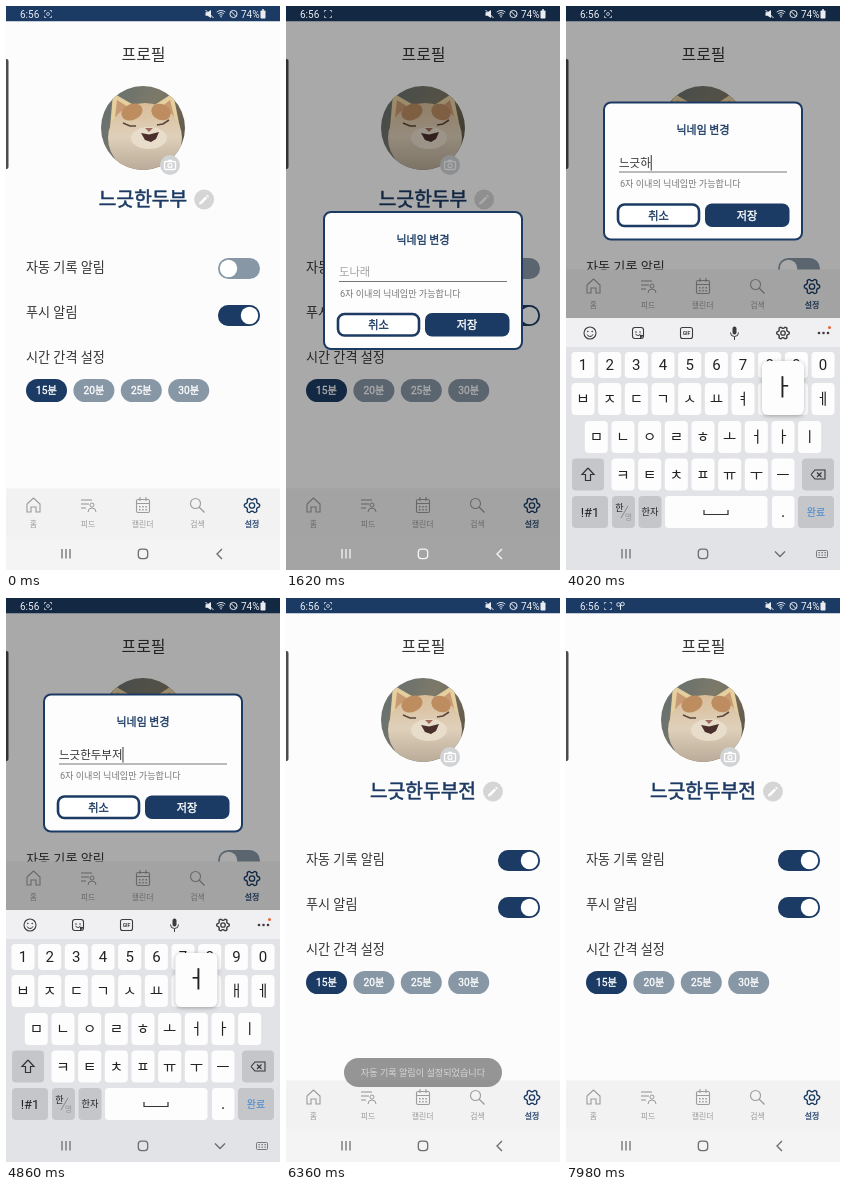
An HTML page with a canvas that plays this animation: 274x564 px, repeating every 8000 ms.

```html
<!DOCTYPE html>
<html lang="ko">
<head>
<meta charset="utf-8">
<title>프로필</title>
<style>
html, body { margin: 0; width: 100%; height: 100%; overflow: hidden; background: #fcfcfc; }
canvas { display: block; width: 274px; height: 564px; }
</style>
</head>
<body>
<canvas id="stage"></canvas>
<script>
const W = 274, H = 564, LOOP = 8000;
const NAVY = '#1c3b64', SLATE = '#8797a5', INK = '#333', GREY = '#9b9b9b';
const FONT = 'Roboto, "Noto Sans CJK KR", "Noto Sans CJK", sans-serif';
const canvas = document.getElementById('stage');
const g = canvas.getContext('2d');
const dpr = window.devicePixelRatio || 1;
canvas.width = W * dpr;
canvas.height = H * dpr;

const ramp = (t, a, b) => Math.min(1, Math.max(0, (t - a) / (b - a)));
const ease = (t, a, b) => 1 - Math.pow(1 - ramp(t, a, b), 3);

function rect(x, y, w, h, r, fill, stroke, lw = 1) {
  g.beginPath();
  g.roundRect(x, y, w, h, r);
  if (fill) { g.fillStyle = fill; g.fill(); }
  if (stroke) { g.strokeStyle = stroke; g.lineWidth = lw; g.stroke(); }
}
function oval(x, y, rx, ry, fill, tilt = 0) {
  g.beginPath();
  g.ellipse(x, y, rx, ry, tilt, 0, 7);
  g.fillStyle = fill; g.fill();
}
function disc(x, y, r, fill, stroke, lw = 1) {
  if (fill) oval(x, y, r, r, fill);
  if (stroke) arc(x, y, r, 0, 7, stroke, lw);
}
function arc(x, y, r, a, b, c, lw = 1) {
  g.beginPath();
  g.arc(x, y, r, a, b);
  g.strokeStyle = c; g.lineWidth = lw; g.stroke();
}
function line(c, lw, ...p) {
  g.beginPath();
  for (let i = 0; i < p.length; i += 2) g.lineTo(p[i], p[i + 1]);
  g.strokeStyle = c; g.lineWidth = lw; g.stroke();
}
function poly(c, ...p) {
  g.beginPath();
  for (let i = 0; i < p.length; i += 2) g.lineTo(p[i], p[i + 1]);
  g.fillStyle = c; g.fill();
}
// y is the visual middle of the line; medium weight is a thin outline on regular
function text(s, x, y, size, c, align = 'left', weight = 400) {
  g.font = `${weight === 500 ? 400 : weight} ${size}px ${FONT}`;
  g.textAlign = align;
  g.fillStyle = g.strokeStyle = c;
  const base = y + size * 0.365;
  g.fillText(s, x, base);
  if (weight === 500) {
    g.lineWidth = size * 0.03;
    g.strokeText(s, x, base);
  }
  return g.measureText(s).width;
}
function at(x, y, alpha, fn) {
  g.save();
  g.translate(x, y);
  g.globalAlpha *= alpha;
  fn();
  g.restore();
}

// ---- icons ----
function gear(x, y, r, c, solid) {
  g.beginPath();
  for (let i = 0; i < 72; i++) {
    const a = i / 36 * Math.PI, k = r * (0.87 + 0.13 * Math.tanh(2 * Math.cos(6 * a)));
    g.lineTo(x + Math.cos(a) * k, y + Math.sin(a) * k);
  }
  g.closePath();
  g.fillStyle = g.strokeStyle = c;
  g.lineWidth = 1.4;
  solid ? g.fill() : g.stroke();
  disc(x, y, r * 0.35, solid && '#f1f1f1', !solid && c, 1.3);
}
function corners(x, y, r, c, dot) {
  for (const sx of [-1, 1]) for (const sy of [-1, 1])
    line(c, 1, x + sx * r, y + sy * r * 0.5, x + sx * r, y + sy * r, x + sx * r * 0.5, y + sy * r);
  if (dot) disc(x, y, r * 0.42, null, c);
}
function mute(x, y, c, k = 1) {
  at(x, y, 1, () => {
    g.scale(k, k);
    poly(c, -4, -1.7, -2, -1.7, 1.5, -4, 1.5, 4, -2, 1.7, -4, 1.7);
    line(c, 1, -4, -4, 4, 4);
  });
}
function wifi(x, y, c, k = 1) {
  for (const r of [2.5, 5, 7.5]) arc(x, y + 3 * k, r * k, -2.3, -0.84, c, 1.1 * k);
  disc(x, y + 3 * k, 0.9 * k, c);
}
function sprout(x, y, c) {
  line(c, 1, x, y + 4, x, y - 1);
  arc(x - 2, y - 1.5, 1.8, 0, 7, c, 0.9);
  arc(x + 2, y - 2, 1.8, 0, 7, c, 0.9);
}
function statusIcons(c) {
  mute(203.5, 8, c);
  wifi(215, 8.3, c, 0.85);
  disc(227.5, 8, 3.6, null, c);
  line(c, 1, 225, 5.5, 230, 10.5);
  text('74%', 235, 8.5, 10, c);
  rect(254.5, 4.5, 5, 8, 0.8, c);
  rect(256, 3.2, 2, 1.5, 0, c);
}

// ---- app ----
function gradient(x0, y0, x1, y1, ...colors) {
  const grad = g.createLinearGradient(x0, y0, x1, y1);
  colors.forEach((c, i) => grad.addColorStop(i / (colors.length - 1), c));
  return grad;
}
function avatar() {
  g.save();
  g.beginPath(); g.arc(137, 122, 42, 0, 7); g.clip();
  rect(94, 79, 86, 86, 0, gradient(95, 100, 180, 140, '#66706f', '#7d7969', '#5d5546'));
  poly('#e6cf9f', 104, 122, 107, 87, 131, 101);
  poly('#e6cf9f', 147, 100, 167, 87, 174, 122);
  poly('#c79a74', 109, 112, 111, 94, 124, 102);
  poly('#c79a74', 154, 102, 164, 94, 169, 114);
  oval(139, 132, 37, 35, gradient(0, 97, 0, 164, '#d9bd98', '#dfd0ba', '#b9ab98'));
  oval(126, 106, 11, 8, '#bd8d60', -0.4);
  oval(155, 106, 10, 8, '#bd8d60', 0.4);
  line('#5a463a', 1.6, 117, 117, 124, 120, 130, 120);
  line('#5a463a', 1.6, 151, 119, 157, 118, 163, 114);
  oval(143, 132, 18, 11, '#e8dccb');
  poly('#9d6a5b', 139, 122, 147, 122, 143, 126);
  poly('#4a2f2c', 135, 127, 143, 128.5, 153, 126, 150, 133, 145, 136, 139, 134);
  g.restore();
  disc(164, 159, 10, '#d1d3d5');
  rect(158.5, 155.5, 11, 8, 1.5, null, '#fff', 1.3);
  line('#fff', 1.5, 162, 154.5, 166, 154.5);
  disc(164, 159.5, 2, null, '#fff', 1.2);
}
function toggle(y, on) {
  rect(212, y - 10.5, 42, 21, 10.5, SLATE);
  at(0, 0, on, () => rect(212, y - 10.5, 42, 21, 10.5, NAVY));
  disc(222.5 + 21 * on, y, 8.7, '#fff');
}
function tabs(shift) {
  at(0, shift, 1, () => {
    rect(0, 482.5, W, 82, 0, '#f2f2f2');
    line(GREY, 1.1, 21, 498, 27.5, 492, 34, 498, 34, 506, 30, 506, 30, 501, 25, 501, 25, 506, 21, 506, 21, 498);
    for (const [y, x2] of [[494, 86], [498, 83], [502, 80]]) line(GREY, 1.1, 75, y, x2, y);
    disc(86, 499, 2, null, GREY);
    arc(86, 506, 4, Math.PI, 0, GREY);
    rect(130.5, 493.5, 13, 13, 1.5, null, GREY, 1.1);
    line(GREY, 1, 130, 497.5, 144, 497.5);
    line(GREY, 1.1, 134, 491, 134, 495);
    line(GREY, 1.1, 140, 491, 140, 495);
    for (let i = 0; i < 6; i++) rect(133 + i % 3 * 3.2, 500 + (i > 2) * 3, 1.5, 1.5, 0, GREY);
    disc(189.5, 497.5, 5, null, GREY, 1.1);
    line(GREY, 1.2, 193, 501, 198.5, 506.5);
    gear(246, 499.5, 7.7, NAVY);
    ['홈', '피드', '캘린더', '검색', '설정'].forEach((s, i) =>
      text(s, 27.3 + i * 54.7, 518.5, 7.9, i === 4 ? NAVY : GREY, 'center', i === 4 ? 500 : 400));
  });
}
function app(t, shift) {
  rect(0, 0, W, H, 0, '#fcfcfc');
  rect(0, 0, W, 15.3, 0, NAVY);
  text('프로필', 137.5, 48, 16, INK, 'center');
  avatar();
  const name = t < 5150 ? '느긋한두부' : '느긋한두부전';
  const px = 137 + text(name, 137, 193, 19.2, NAVY, 'center', 500) / 2 + 17;
  disc(px, 193.5, 10, '#d5d5d5');
  line('#fff', 2.6, px - 3.2, 196.8, px + 2.2, 191.4);
  line('#fff', 2.6, px + 3, 190.6, px + 4, 189.6);
  poly('#fff', px - 5, 198.5, px - 4.5, 195.5, px - 2, 198);
  text('자동 기록 알림', 20, 261.5, 13.1, INK);
  toggle(262.5, ease(t, 6080, 6260));
  text('푸시 알림', 20, 306, 13.1, INK);
  toggle(309.5, 1);
  text('시간 간격 설정', 20, 351, 13.1, INK);
  ['15분', '20분', '25분', '30분'].forEach((s, i) => {
    const x = 20 + i * 47.4;
    rect(x, 373, 41, 23, 11.5, i ? SLATE : NAVY);
    text(s, x + 20.5, 384.5, 10.2, '#fff', 'center', 500);
  });
  rect(-3, 53, 5.5, 110, 2, '#4b4b4d');
  tabs(shift);
  if (!shift) rect(0, 531, W, 33, 0, '#f4f4f4');
}
function status(t) {
  const c = '#e9edf2';
  text('6:56', 14, 8.5, 10, c);
  at(0, 0, 0.7, () => corners(42, 8, 3.5, c, t % 2000 < 1200));
  if (t > 6420) sprout(54.5, 8, c);
  statusIcons(c);
}
function nav(c, keyboard) {
  for (const x of [56, 60, 64]) line(c, 1.3, x, 543, x, 552.5);
  rect(132.3, 543.2, 9.4, 9.4, 3, null, c, 1.3);
  if (!keyboard) return line(c, 1.4, 216, 543, 211, 548, 216, 553);
  line(c, 1.4, 209, 545.5, 214, 550.5, 219, 545.5);
  rect(250.5, 544.5, 11, 7, 1, null, c, 0.9);
  for (let i = 0; i < 6; i++) rect(252.5 + i % 3 * 3, 546 + (i > 2) * 2.5, 1.3, 1.3, 0, c);
}

// ---- typing: time, key, text so far ----
const strokes = [
  [2300, 'ㄴ', 'ㄴ'], [2440, 'ㅡ', '느'], [2580, 'ㄱ', '늑'], [2740, 'ㅡ', '느그'],
  [2880, 'ㅅ', '느긋'], [3600, 'ㅎ', '느긋ㅎ'], [3980, 'ㅏ', '느긋하'], [4140, 'ㄴ', '느긋한'],
  [4260, 'ㄷ', '느긋한ㄷ'], [4370, 'ㅜ', '느긋한두'], [4490, 'ㅂ', '느긋한둡'],
  [4600, 'ㅜ', '느긋한두부'], [4720, 'ㅈ', '느긋한두붖'], [4830, 'ㅓ', '느긋한두부저'],
  [4940, 'ㄴ', '느긋한두부전']
];
const lastStroke = t => strokes.filter(s => s[0] <= t).pop();

function dialog(t) {
  rect(38, 206, 198, 137, 7, '#fdfdfd', NAVY, 2);
  text('닉네임 변경', 137, 234, 10.9, NAVY, 'center', 500);
  const s = lastStroke(t);
  const w = s ? text(s[2], 53, 266, 11.5, INK) : (text('도나래', 53, 266, 11.3, '#a3a3a3'), 0);
  if (t > 1850 && (t - (s ? s[0] : 1850)) % 1000 < 500) line('#333', 1, 53.5 + w, 258.5, 53.5 + w, 274);
  line('#777', 1, 53, 275.5, 221, 275.5);
  text('6자 이내의 닉네임만 가능합니다', 54, 287.5, 9.1, '#757575');
  rect(52, 308, 81, 21.5, 6.5, '#fff', NAVY, 2.6);
  text('취소', 92.5, 319, 11.2, NAVY, 'center', 500);
  rect(139, 307, 84.5, 23.5, 7, NAVY);
  text('저장', 181, 319, 11.2, '#fff', 'center', 500);
}

const rows = [
  { keys: '1234567890', x: 17, y: 346, h: 26 },
  { keys: 'ㅂㅈㄷㄱㅅㅛㅕㅑㅐㅔ', x: 17, y: 377, h: 32 },
  { keys: 'ㅁㄴㅇㄹㅎㅗㅓㅏㅣ', x: 30.3, y: 415, h: 32 },
  { keys: 'ㅋㅌㅊㅍㅠㅜㅡ', x: 57, y: 452.5, h: 32 }
];
const STEP = 26.67, KEY = '#c4c6c9';

function toolbar() {
  const c = '#3c3c3e';
  rect(0, 312, W, 29, 0, '#f0f0f2');
  disc(24, 327, 6, null, c, 1.1);
  disc(21.8, 325.5, 0.8, c); disc(26.2, 325.5, 0.8, c);
  arc(24, 327.5, 3, 0.3, 2.8, c);
  rect(66.5, 321.5, 11, 11, 2.5, null, c, 1.1);
  disc(70, 326, 0.8, c); disc(74, 326, 0.8, c);
  arc(72, 327, 2.5, 0.3, 2.8, c);
  poly(c, 74, 333, 78, 329, 74, 329);
  rect(114.5, 321.5, 12, 11, 2, null, c, 1.1);
  text('GIF', 120.5, 327, 5, c, 'center', 700);
  rect(166.5, 320.5, 4, 8, 2, c);
  arc(168.5, 326.5, 4, 0, Math.PI, c);
  line(c, 1, 168.5, 330.5, 168.5, 334);
  gear(217, 327, 6.3, c);
  for (const x of [253, 257.5, 262]) disc(x, 327, 1.3, c);
  disc(263.5, 321.5, 1.5, '#e8672f');
}
function keyboard(t) {
  rect(0, 312, W, 252, 0, '#e1e3e6');
  toolbar();
  for (const r of rows) [...r.keys].forEach((k, i) => {
    const x = r.x + i * STEP;
    rect(x - 11.5, r.y, 23, r.h, 4, '#fdfdfd');
    text(k, x, r.y + r.h / 2, r.h < 30 ? 15 : 14.5, '#222', 'center');
  });
  rect(6, 452.5, 32, 32, 4, KEY);
  line('#333', 1.2, 22, 462, 16, 468.5, 19.5, 468.5, 19.5, 474.5, 24.5, 474.5, 24.5, 468.5, 28, 468.5, 22, 462);
  rect(236, 452.5, 32, 32, 4, KEY);
  line('#333', 1.1, 245, 468.5, 249, 464, 259, 464, 259, 473, 249, 473, 245, 468.5);
  line('#333', 1.1, 251, 466.5, 255.5, 471);
  line('#333', 1.1, 255.5, 466.5, 251, 471);
  for (const [x, w, c] of [[6, 36, KEY], [46, 23, KEY], [72.5, 23, KEY], [99, 102.5, '#fdfdfd'], [206, 22.5, '#fdfdfd'], [232, 36, KEY]])
    rect(x, 490, w, 32, 4, c);
  text('!#1', 24, 506, 13, '#222', 'center');
  text('한', 53.5, 502, 9, '#222', 'center');
  line('#777', 0.8, 55, 512, 62, 500);
  text('영', 62.5, 511, 8, '#999', 'center');
  text('한자', 84, 506, 9.3, '#222', 'center');
  line('#333', 1.2, 138, 504, 138, 508.5, 162, 508.5, 162, 504);
  text('.', 217, 505, 16, '#222', 'center');
  text('완료', 250, 506, 10, '#3a83d0', 'center');

  const s = lastStroke(t);
  if (!s || t - s[0] > 95) return;
  const row = rows.find(r => r.keys.includes(s[1]));
  const x = row.x + row.keys.indexOf(s[1]) * STEP;
  g.save();
  g.shadowColor = 'rgba(0,0,0,.3)'; g.shadowBlur = 4 * dpr; g.shadowOffsetY = dpr;
  rect(x - 21, row.y - 60, 42, 54, 6, '#fdfdfd');
  g.restore();
  text(s[1], x, row.y - 34, 23, '#222', 'center');
}

function toast() {
  rect(58, 460, 158, 29, 14.5, '#565656');
  text('자동 기록 알림이 설정되었습니다', 137, 474.5, 9.15, '#fff', 'center');
}

// ---- notification shade ----
function quickTiles() {
  for (let i = 0; i < 6; i++) disc(24 + i * 45.1, 68, 15.7, i === 0 || i === 2 ? '#1c84ec' : '#dcdcdc');
  const c = '#8a8a8a';
  wifi(24, 69, '#fff', 1.55);
  mute(69, 68, c, 1.6);
  corners(114, 68, 7.5, '#fff');
  rect(109, 64.5, 7, 7, 1.5, '#fff');
  poly('#fff', 116, 68, 119.5, 65, 119.5, 71);
  line(c, 1.4, 155, 64, 163, 72, 159, 76, 159, 60, 163, 64, 155, 72);
  rect(199.5, 61, 10, 14, 1.5, c);
  rect(202, 67, 5, 4, 0.5, '#eee');
  arc(204.5, 67, 1.6, Math.PI, 0, '#eee');
  poly(c, 245, 61, 254, 61, 254, 64, 251.8, 67, 251.8, 76, 247.2, 76, 247.2, 67, 245, 64);
  rect(248.8, 68, 1.5, 3, 0.5, '#eee');
}
function shadeContent() {
  const c = '#333';
  rect(0, -60, W, 400, 0, '#f1f1f1');
  text('6:56', 15, 8.5, 10, '#555');
  rect(183, 4, 10, 8, 1.5, '#d8434b');
  poly('#fff', 186.5, 6, 190.5, 8, 186.5, 10);
  statusIcons('#666');
  text('11월 15일 (금)', 16, 33, 12.8, '#222');
  arc(227, 33.5, 5, -0.9, 4.05, c, 1.5);
  line(c, 1.5, 227, 27, 227, 33);
  gear(254, 33, 6, c, true);
  quickTiles();
  disc(146, 99, 5.5, '#222');
  poly('#fff', 144.5, 96.5, 149, 99, 144.5, 101.5);
  text('미디어', 156, 99, 8.5, '#222', 'left', 500);
  line('#999', 0.8, 193, 95.5, 193, 103);
  for (let i = 0; i < 4; i++) rect(210.5 + i % 2 * 5.5, 94.5 + (i > 1) * 5.5, 4.3, 4.3, 1.5, '#222');
  text('디바이스', 226, 99, 8.4, '#222', 'left', 500);
  rect(132, 117, 10, 2, 1, '#bcbcbc');

  rect(0, 127, W, 64, [18, 18, 0, 0], '#da2435');
  at(0, 0, 0.8, () => corners(20, 144, 3.3, '#fff'));
  text('화면 녹화', 30, 144, 8.4, '#fff', 'left', 500);
  text('녹화를 중지하려면 여기를 누르세요.', 16, 160.5, 9.7, '#fff', 'left', 500);
  text('00:14', 16, 176.5, 8.7, '#ffd5d8');

  rect(0, 190.5, W, 60.5, [0, 0, 18, 18], '#fcfcfc');
  sprout(20.5, 208, '#777');
  text('Jotlumenday', 29, 208.5, 8.6, '#777');
  text('오전 6:56', 86, 208.5, 8.4, '#555');
  text('조트루멘데이', 16, 225, 9.6, '#222', 'left', 500);
  text('현재 달솔가람교회에 머무르고 있어요!', 16, 240, 8.4, '#444');
  text('알림 설정', 174, 270, 8.7, '#222', 'left', 700);
  text('지우기', 231, 270, 8.5, '#aaa', 'left', 500);
}
function shade(p) {
  rect(0, 0, W, H, 0, `rgba(0,0,0,${0.79 * p})`);
  g.save();
  g.beginPath();
  g.roundRect(0, 0, W, 287 * p, [0, 0, 19 * p, 19 * p]);
  g.clip();
  at(0, -40 * (1 - p), 1, shadeContent);
  g.restore();
  at(0, 0, p, () => text('제한구역서비스', 137, 519.5, 8.4, '#eee', 'center'));
}

function draw(t) {
  g.setTransform(dpr, 0, 0, dpr, 0, 0);
  const kb = ease(t, 1800, 2050) - ease(t, 5130, 5380);
  const dlg = ramp(t, 1200, 1320) - ramp(t, 5110, 5230);
  const pull = ease(t, 6780, 6990) - ease(t, 7620, 7880);
  const note = ramp(t, 6300, 6400) - ramp(t, 7480, 7600);

  app(t, -219 * kb);
  if (dlg > 0) {
    rect(0, 0, W, H, 0, `rgba(0,0,0,${0.33 * dlg})`);
    at(0, -109.5 * kb, dlg, () => dialog(t));
  }
  if (kb > 0) at(0, 252 * (1 - kb), 1, () => keyboard(t));
  status(t);
  if (pull > 0) shade(pull);
  if (note > 0) at(0, 0, note, toast);
  const light = pull > 0.4 || (dlg > 0.5 && kb < 0.3);
  nav(light ? '#f4f4f4' : '#6e6e6e', kb > 0.3);
}

const start = performance.now();
function tick() {
  draw((performance.now() - start) % LOOP);
  requestAnimationFrame(tick);
}
tick();
</script>
</body>
</html>
```
